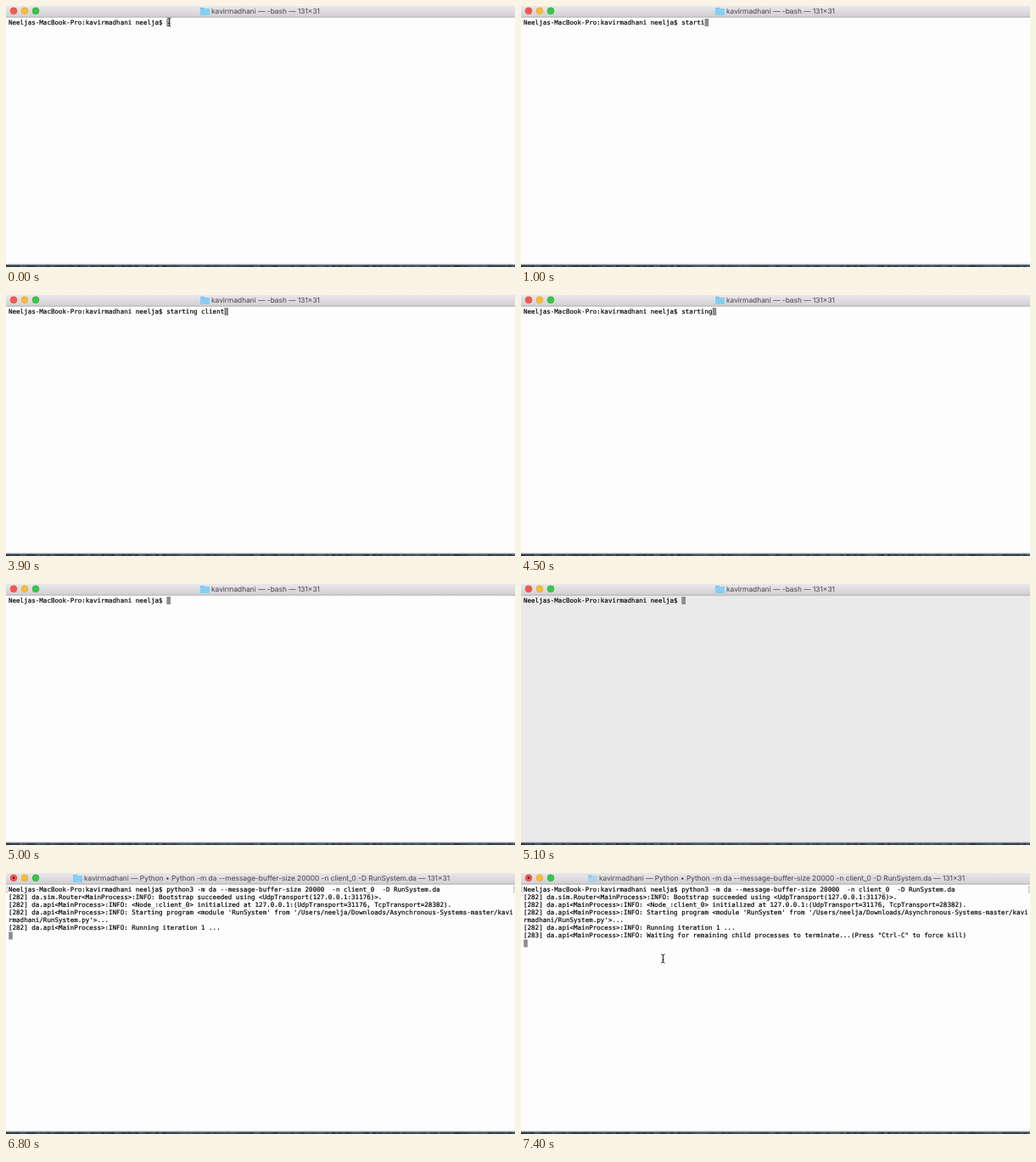
Write an HTML page with a canvas that moves like this. It is 600x308 px and loops after 8000 ms.

```html
<!DOCTYPE html>
<html lang="en">
<head>
<meta charset="utf-8">
<title>Terminal session</title>
<style>
  html, body { margin: 0; width: 100%; height: 100%; overflow: hidden; }
  canvas { display: block; }
</style>
</head>
<body>
<canvas id="stage" width="600" height="308"></canvas>
<script>
const ctx = document.getElementById('stage').getContext('2d');
const LOOP = 8000, COLS = 131;
const CELL = { x: 3, y: 15, w: 4.54, h: 9.07 };

const USER = 'kavirmadhani';
const PROMPT = `Neeljas-MacBook-Pro:${USER} neelja$ `;
const FIRST = 'starting client ';
const COMMAND = 'python3 -m da --message-buffer-size 20000  -n client_0  -D RunSystem.da ';
const IDLE_TITLE = `${USER} — -bash — 131×31`;
const BUSY_TITLE = `${USER} — Python • Python ${COMMAND.slice(8).replace(/ +/g, ' ')}— 131×31`;

const API = 'da.api<MainProcess>:INFO: ';
const OUTPUT = [
  { at: 6700, text: '[282] da.sim.Router<MainProcess>:INFO: Bootstrap succeeded using <UdpTransport(127.0.0.1:31176)>.' },
  { at: 6700, text: `[282] ${API}<Node_:client_0> initialized at 127.0.0.1:(UdpTransport=31176, TcpTransport=28382).` },
  { at: 6800, text: `[282] ${API}Starting program <module 'RunSystem' from '/Users/neelja/Downloads/Asynchronous-Systems-master/${USER}/RunSystem.py'>...` },
  { at: 6800, text: `[282] ${API}Running iteration 1 ...` },
  { at: 6900, text: `[283] ${API}Waiting for remaining child processes to terminate...(Press "Ctrl-C" to force kill)` }
];

const clamp = v => Math.max(0, Math.min(1, v));

function typedText(t) {
  if (t >= 6100) return COMMAND;
  let count = 0;
  if (t >= 4200) count = 15 - Math.round(15 * clamp((t - 4100) / 900));
  else if (t >= 3900) count = 15;
  else if (t >= 1900) count = 16;
  else if (t >= 1000) count = 5 + Math.round(10 * clamp((t - 900) / 900));
  else if (t >= 800) count = 5;
  else if (t >= 400) count = Math.min(3, (t - 300) / 100);
  return FIRST.slice(0, count);
}

function rect(x, y, w, h, fill) {
  ctx.fillStyle = fill;
  ctx.fillRect(x, y, w, h);
}

function disc(x, y, r, fill, edge) {
  ctx.beginPath();
  ctx.arc(x, y, r, 0, Math.PI * 2);
  ctx.fillStyle = fill;
  ctx.fill();
  if (edge) {
    ctx.strokeStyle = edge;
    ctx.lineWidth = 0.5;
    ctx.stroke();
  }
}

function drawFolder(x, alpha) {
  ctx.globalAlpha = alpha;
  ctx.fillStyle = '#68bfe8';
  ctx.beginPath();
  ctx.roundRect(x, 2, 5, 4, 1);
  ctx.fill();
  ctx.fillStyle = '#84cff3';
  ctx.beginPath();
  ctx.roundRect(x, 3, 11, 8, 0.8);
  ctx.fill();
  ctx.globalAlpha = 1;
}

function drawTitleBar(t) {
  const busy = t >= 6600;
  const shade = ctx.createLinearGradient(0, 0, 0, 13);
  shade.addColorStop(0, '#e9e7e9');
  shade.addColorStop(1, '#d2d0d2');
  rect(0, 0, 600, 13, shade);
  rect(0, 12.7, 600, 0.9, '#a9a7a9');

  disc(9, 5.8, 4, '#f05a54', '#d24a45');
  disc(22, 5.8, 4, '#f6bc3b', '#d9a134');
  disc(35, 5.8, 4, '#38c548', '#2ca63a');
  if (busy) disc(9, 5.8, 1.4, '#6b1512');

  drawFolder(busy ? 79 : 229, t >= 7100 ? 0.5 : 1);
  ctx.font = '8.35px Inter, sans-serif';
  ctx.fillStyle = '#454345';
  ctx.fillText(busy ? BUSY_TITLE : IDLE_TITLE, busy ? 92 : 242, 9);
}

function drawRow(text, row) {
  ctx.font = '7.54px "DejaVu Sans Mono", monospace';
  ctx.fillStyle = ctx.strokeStyle = '#050505';
  ctx.lineWidth = 0.18;
  [...text].forEach((ch, i) => {
    const x = CELL.x + i * CELL.w, y = CELL.y + row * CELL.h + 6.9;
    ctx.fillText(ch, x, y);
    ctx.strokeText(ch, x, y);
  });
}

function drawMarks() {
  ctx.strokeStyle = '#9a989a';
  ctx.lineWidth = 0.7;
  ctx.beginPath();
  for (const [x, d] of [[1, 1.3], [599, -1.3]]) {
    ctx.moveTo(x + d, 16);
    ctx.lineTo(x, 16);
    ctx.lineTo(x, 23);
    ctx.lineTo(x + d, 23);
  }
  ctx.stroke();
}

function drawPointer(x, y) {
  ctx.beginPath();
  for (const s of [-1, 1]) {
    ctx.moveTo(x - 2, y + s * 5);
    ctx.quadraticCurveTo(x, y + s * 5, x, y + s * 3.7);
    ctx.quadraticCurveTo(x, y + s * 5, x + 2, y + s * 5);
  }
  ctx.moveTo(x, y - 4);
  ctx.lineTo(x, y + 4);
  ctx.moveTo(x - 1, y + 1.5);
  ctx.lineTo(x + 1, y + 1.5);
  for (const [width, color] of [[2, '#fff'], [1, '#151515']]) {
    ctx.lineWidth = width;
    ctx.strokeStyle = color;
    ctx.stroke();
  }
}

function drawDesktopEdge() {
  rect(0, 304.6, 600, 1, '#a2a4a8');
  rect(0, 305.6, 600, 2.4, '#3d4b57');
  for (let x = 0; x < 600; x += 4) {
    const n = Math.sin(x * 12.9898) * 43758.5453;
    rect(x, 305.8, 4, 2.2, `hsl(205 20% ${20 + 14 * (n - Math.floor(n))}%)`);
  }
}

function draw(t) {
  // The bell greys the window, then fades out.
  const bell = t >= 5100 && t < 5500 ? clamp((5500 - t) / 400) : 0;
  const level = 253 - 18 * bell;
  rect(0, 0, 600, 308, `rgb(${level} ${level - bell} ${level})`);
  drawTitleBar(t);
  drawDesktopEdge();

  const line = PROMPT + typedText(t);
  const rows = [line];
  if (t >= 6500) {
    drawMarks();
    for (const { at, text } of OUTPUT) {
      if (t < at) continue;
      for (let i = 0; i < text.length; i += COLS) rows.push(text.slice(i, i + COLS));
    }
    rows.push('');
  }
  rows.forEach(drawRow);

  const last = rows.length - 1;
  rect(CELL.x + rows[last].length * CELL.w + 0.2, CELL.y + last * CELL.h, 4.6, 9, '#8e8c8e');

  if (t < 400) drawPointer(192.3, 18.9);
  if (t >= 7100) {
    const p = clamp((t - 7100) / 300);
    drawPointer(171 - 3.6 * p, 88 + 13 * p);
  }
}

ctx.textRendering = 'geometricPrecision';
const start = performance.now();
function frame() {
  const t = (performance.now() - start) % LOOP;
  draw(Math.floor(t / 100) * 100);
  requestAnimationFrame(frame);
}
frame();
</script>
</body>
</html>
```
